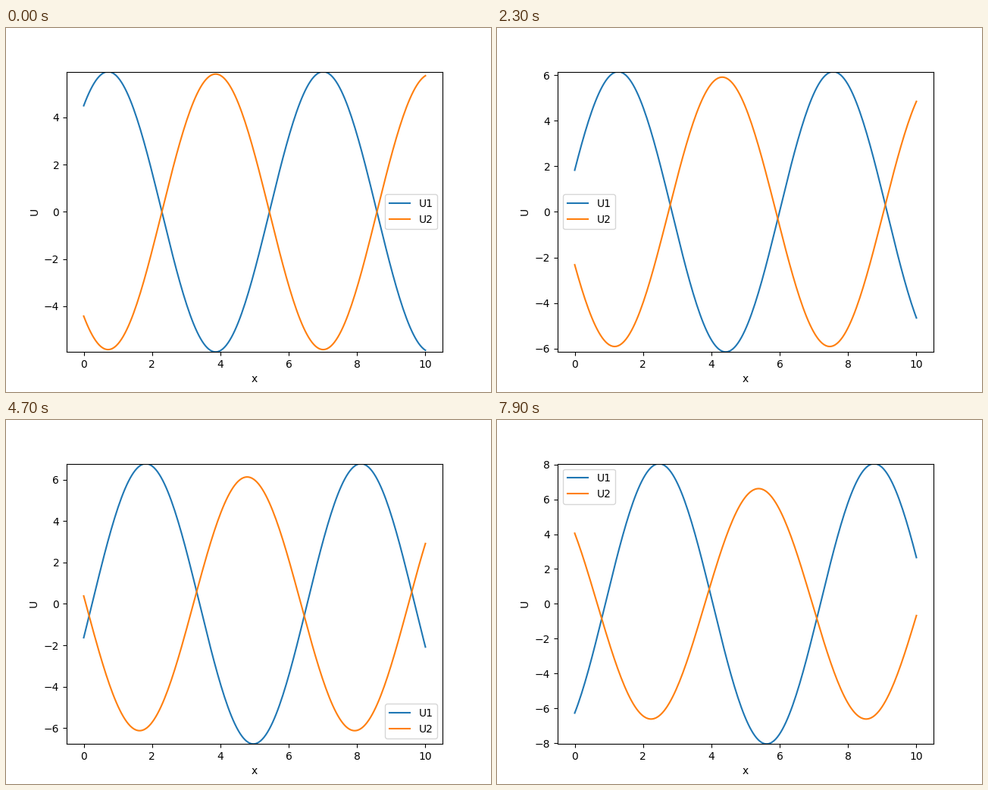
Animation of 640x480 px, one loop 8 s. Source, as a matplotlib script:

```python
import numpy as np
import matplotlib.pyplot as plt
from matplotlib.animation import FuncAnimation

FRAMES, STEP = 80, 100
K = 0.9982       # wave number
SHIFT = 0.712    # common phase at the start
DAMPING = 0.0004

x = np.linspace(0, 10, 200)


def wave(amp, speed, t):
    """Slightly damped cosine travelling to the right."""
    return amp * np.exp(-DAMPING * t) * np.exp(1j * (SHIFT + speed * t - K * x))


def solve(t):
    """Two characteristic waves mixed into U1 and U2, with the peak of U1."""
    slow, fast = wave(5.64, 0.10, t), wave(5.74, 0.15, t)
    u1 = 3 * fast - 2 * slow
    u2 = slow - 2 * fast
    return u1.real, u2.real, abs(u1[0])


fig, ax = plt.subplots(figsize=(6.4, 4.8), dpi=100)
u1, u2, _ = solve(0)
line1, = ax.plot(x, u1, label="U1")
line2, = ax.plot(x, u2, label="U2")
ax.set_xlabel("x")
ax.set_ylabel("U")
ax.legend(loc="best")


def update(i):
    u1, u2, peak = solve(i * STEP / 1000)
    line1.set_ydata(u1)
    line2.set_ydata(u2)
    ax.set_ylim(-peak, peak)
    return line1, line2


anim = FuncAnimation(fig, update, frames=FRAMES, interval=STEP,
                     repeat=True, repeat_delay=0, blit=False)
plt.show()
```
